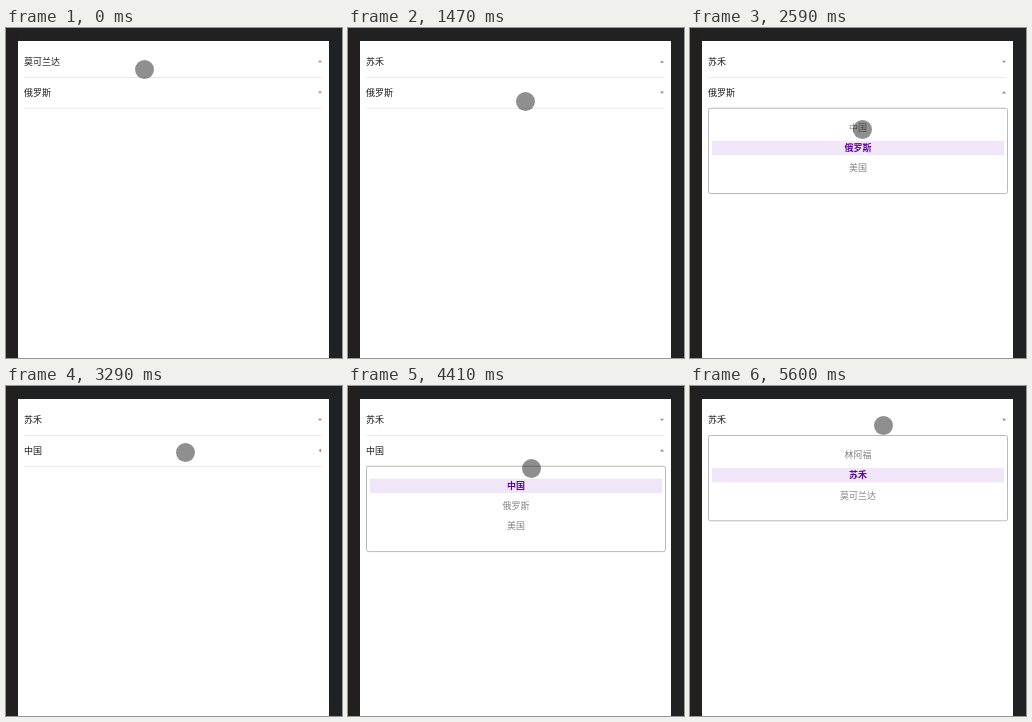
Recreate the animation shown at these times as an HTML page. Size 336 by 330 pixels, loop 5670 ms.

```html
<!DOCTYPE html>
<html lang="zh-CN">
<head>
<meta charset="utf-8">
<title>Dropdown pickers</title>
<style>
  html, body { margin: 0; width: 100%; height: 100%; overflow: hidden; background: #202122; }
  svg { display: block; width: 336px; height: 330px; }
  text { font: 9px "Noto Sans CJK SC", "Noto Sans CJK", sans-serif; }
  .value { fill: #1c1c1c; font-weight: 500; }
  .item { fill: #858585; text-anchor: middle; }
  .item.on { fill: #5c0a9c; font-weight: 700; }
</style>
</head>
<body>
<svg id="stage" viewBox="0 0 336 330"></svg>
<script>
const LOOP = 5670, STEP = 70, TURN = 300;
const stage = document.getElementById('stage');

// Each picker: options, row centre, rule position, open spans and value changes.
const pickers = [
  { options: ['林阿福', '苏禾', '莫可兰达'], row: 34, top: 49.5,
    spans: [[280, 1430], [5530, LOOP]], picks: [[0, 2], [1430, 1]] },
  { options: ['中国', '俄罗斯', '美国'], row: 64.7, top: 80.3,
    spans: [[2170, 3150], [3710, 4550], [5110, 5530]], picks: [[0, 1], [3150, 0]] }
];

// Touch pointer: time, x, y.
const path = [
  [0, 138.5, 41.5], [280, 138.5, 41.5], [560, 133, 70], [630, 133, 70],
  [840, 174.5, 83.5], [1000, 180, 93], [1190, 180, 93], [1470, 177.5, 73.5],
  [2170, 177.5, 73.5], [2590, 172.5, 101.5], [2660, 174, 101], [2870, 174, 101],
  [3220, 179.5, 66.5], [3570, 179.5, 66.5], [4060, 182, 219], [4200, 182, 219],
  [4410, 183.5, 82.5], [4600, 183, 61], [4760, 183, 61], [5110, 192, 30],
  [5320, 192, 30], [5600, 193.5, 39.5], [LOOP, 193.5, 39.5]
];
const releases = [1120, 1890, 2800, 3430, 4200, 4760, 5250];

function add(tag, attrs, parent = stage) {
  const node = document.createElementNS('http://www.w3.org/2000/svg', tag);
  for (const key in attrs) node.setAttribute(key, attrs[key]);
  return parent.appendChild(node);
}

function label(x, cy, kind, parent, content = '') {
  const node = add('text', { x, y: cy + 3.4, class: kind }, parent);
  node.textContent = content;
  return node;
}

const clamp01 = v => Math.max(0, Math.min(1, v));
const ease = u => u * u * (3 - 2 * u);

add('rect', { width: 336, height: 330, fill: '#202122' });
add('rect', { width: 12, height: 330, fill: '#22201e' });
add('rect', { x: 12, y: 13, width: 311, height: 317, fill: '#fff' });

for (const p of pickers) {
  p.value = label(18, p.row, 'value');
  add('path', { d: `M18 ${p.top}H316`, stroke: '#ebebeb' });
  p.arrow = add('path', { d: 'M-2-1H2L0 1.3Z', fill: '#8c8c8c' });
}

for (const p of pickers) {
  p.menu = add('g', {});
  add('rect', { x: 18.5, y: p.top, width: 299, height: 85.3, rx: 2, fill: '#fff', stroke: '#b9b9b9' }, p.menu);
  p.band = add('rect', { x: 22, width: 292, height: 14.4, fill: '#f0e6f7' }, p.menu);
  p.centres = p.options.map((_, i) => p.top + 19.2 + i * 20.2);
  p.items = p.options.map((name, i) => label(168, p.centres[i], 'item', p.menu, name));
}

const pointer = add('g', {});
const halo = add('circle', { r: 22, fill: '#000', opacity: 0.12 }, pointer);
add('circle', { r: 9.5, fill: '#000', opacity: 0.44 }, pointer);

function pointerAt(t) {
  const i = Math.max(1, path.findIndex(k => k[0] >= t));
  const [t0, x0, y0] = path[i - 1], [t1, x1, y1] = path[i];
  const u = ease(clamp01((t - t0) / (t1 - t0)));
  return [x0 + (x1 - x0) * u, y0 + (y1 - y0) * u];
}

function arrowAngle(p, t) {
  let angle = 0;
  for (const [from, to] of p.spans) {
    if (t >= from) angle = 180 * ease(clamp01((t - from) / TURN));
    if (t >= to) angle = 180 * (1 - ease(clamp01((t - to) / TURN)));
  }
  return angle;
}

function render(t) {
  for (const p of pickers) {
    const chosen = p.picks.filter(([at]) => t >= at).pop()[1];
    const open = p.spans.some(([from, to]) => t >= from && t < to);
    p.value.textContent = p.options[chosen];
    p.menu.setAttribute('display', open ? 'inline' : 'none');
    p.band.setAttribute('y', p.centres[chosen] - 6.9);
    p.items.forEach((item, i) => item.classList.toggle('on', i === chosen));
    p.arrow.setAttribute('transform', `translate(314 ${p.row - 0.3}) rotate(${arrowAngle(p, t)})`);
  }
  pointer.setAttribute('transform', `translate(${pointerAt(t)})`);
  const pressed = releases.some(end => t >= end - STEP && t < end);
  halo.setAttribute('display', pressed ? 'inline' : 'none');
}

const start = performance.now();
function frame() {
  const t = (performance.now() - start) % LOOP;
  render(Math.floor(t / STEP) * STEP);
  requestAnimationFrame(frame);
}
frame();
</script>
</body>
</html>
```
